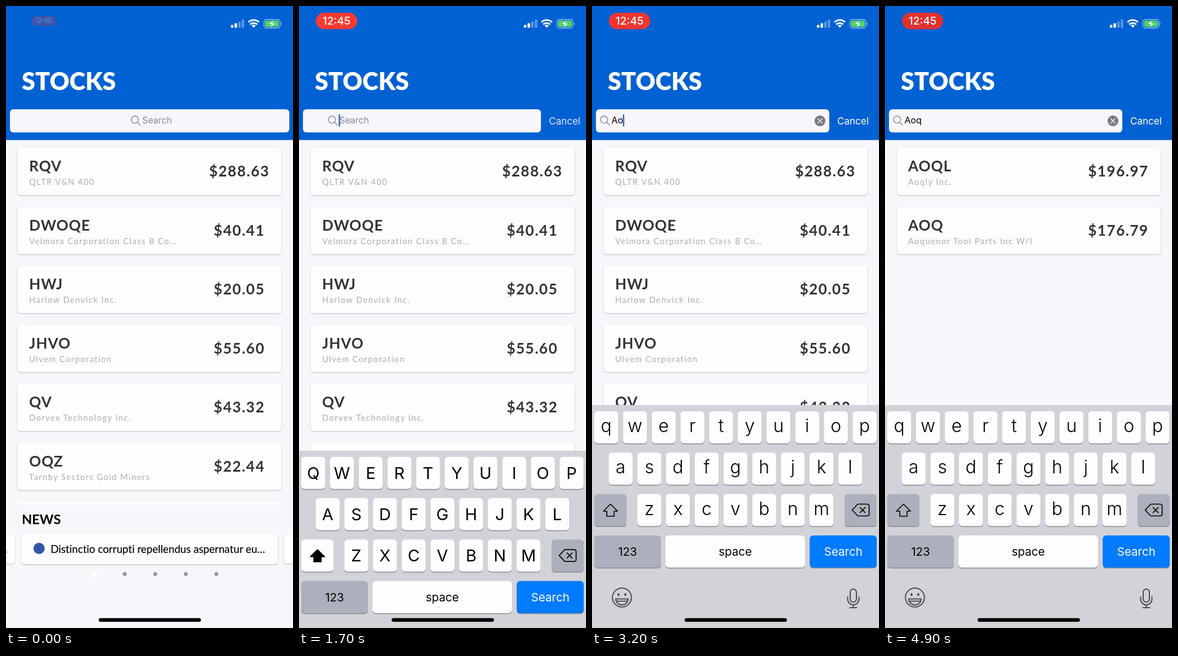
An HTML page that plays this animation: 508 by 1102 pixels, repeating every 5 s.

```html
<!DOCTYPE html>
<html lang="en">
<head>
<meta charset="utf-8">
<title>Stocks search</title>
<style>
html, body { margin: 0; width: 100%; height: 100%; overflow: hidden; background: #f8f6fa; }
svg { display: block; width: 100vw; height: 100vh; }
text { font-family: Inter, Roboto, sans-serif; }
.l { font-family: Lato, "Open Sans", sans-serif; font-variant-ligatures: none; }
.mid { text-anchor: middle; }
.card { fill: #fefdff; filter: drop-shadow(0 1px 1.3px rgba(0, 0, 0, .24)); }
.sym { font-size: 26px; font-weight: 700; letter-spacing: 1px; fill: #333236; }
.price { letter-spacing: 1.5px; }
.sub { font-size: 14.5px; letter-spacing: 1.5px; fill: #adabb0; }
.line { fill: none; stroke-linecap: round; stroke-linejoin: round; }
</style>
</head>
<body>
<svg viewBox="0 0 508 1102" preserveAspectRatio="none">
  <rect width="508" height="1102" fill="#f8f6fa"/>
  <g id="list"></g>

  <rect y="884" width="508" height="218" fill="#f8f6fa"/>
  <text class="l" x="28" y="918" font-size="23.5" font-weight="700">NEWS</text>
  <rect class="card" x="-20" y="936" width="36" height="52" rx="5"/>
  <rect class="card" x="492" y="936" width="36" height="52" rx="5"/>
  <rect class="card" x="27" y="935" width="454" height="54" rx="5"/>
  <circle cx=".5" cy="967.5" r="1" fill="#333"/>
  <circle cx="58.5" cy="961" r="10" fill="#2f56a6"/>
  <text class="l" x="79" y="969" font-size="18.7" stroke="#000" stroke-width=".15">Distinctio corrupti repellendus aspernatur eu…</text>
  <g id="dots"></g>

  <rect width="508" height="237.5" fill="#0061d3"/>
  <text class="l" x="28" y="149" font-size="43" font-weight="900" fill="#fff">STOCKS</text>

  <g id="pill">
    <rect x="-36.5" y="-14.5" width="73" height="29" rx="14.5"/>
    <text class="mid" y="6.7" font-size="19" font-weight="500" fill="#fff">12:45</text>
  </g>
  <g fill="#fff">
    <rect x="398" y="33.5" width="4.4" height="5" rx="1"/>
    <rect x="404.5" y="30.5" width="4.4" height="8" rx="1"/>
    <rect x="411" y="27.5" width="4.4" height="11" rx="1" opacity=".35"/>
    <rect x="417.3" y="24" width="4.4" height="14.5" rx="1" opacity=".35"/>
    <path d="M438.5 38.5l-3.6-3.8a5.2 5.2 0 0 1 7.2 0z"/>
  </g>
  <path d="M432.3 32.6a9 9 0 0 1 12.4 0M429.3 28.6a13.3 13.3 0 0 1 18.4 0" fill="none" stroke="#fff" stroke-width="2.9"/>
  <rect x="456.5" y="24" width="28.5" height="15" rx="4.2" fill="none" stroke="#fff" stroke-opacity=".6" stroke-width="1.3"/>
  <rect x="458.5" y="26" width="24.5" height="11" rx="2.4" fill="#4cd964"/>
  <path d="M486.5 29a3 3 0 0 1 0 5z" fill="#fff" opacity=".6"/>
  <path d="M474 24.5l-10 8h6l-2.5 6 10.5-8h-6.3z" fill="#fff" stroke="#2c9d6e" stroke-width=".7"/>

  <rect id="field" x="7" y="183" height="41" rx="6" fill="#f8f6fa"/>
  <g id="prompt">
    <g class="line" stroke="#8a898e" stroke-width="1.4">
      <circle cx="-13" cy="201.3" r="6.3"/>
      <path d="M-8.4 206L-3.5 211"/>
    </g>
    <text id="query" y="208" font-size="16" letter-spacing="-.1"></text>
    <rect id="caret" y="192" width="2.5" height="21.5" rx="1" fill="#2c68d2"/>
  </g>
  <g id="clear">
    <circle cx="403.5" cy="203.5" r="9.6" fill="#7b7a7f"/>
    <path class="line" d="M399.5 199.5l8 8m0-8l-8 8" stroke="#f8f6fa" stroke-width="1.3"/>
  </g>
  <text id="cancel" y="210" font-size="17" fill="#fff">Cancel</text>

  <g id="board"></g>
  <rect x="164" y="1084.5" width="181" height="6.5" rx="3.25"/>
</svg>

<script>
const $ = id => document.getElementById(id);
const clamp = x => Math.max(0, Math.min(1, x));
const smooth = x => { x = clamp(x); return x * x * (3 - 2 * x); };
const set = (el, attrs) => { for (const k in attrs) el.setAttribute(k, attrs[k]); };

const LOOP = 5000, STEP = 100, FOCUS = 1537;

const allRows = [
  ["RQV", "QLTR V&amp;N 400", "288.63"],
  ["DWOQE", "Velmora Corporation Class B Co…", "40.41"],
  ["HWJ", "Harlow Denvick Inc.", "20.05"],
  ["JHVO", "Ulvem Corporation", "55.60"],
  ["QV", "Dorvex Technology Inc.", "43.32"],
  ["OQZ", "Tarnby Sectors Gold Miners", "22.44"],
  ["", "", ""]
];
const first = ["AOQL", "Aoqly Inc.", "196.97"];
const twoLetterRows = [
  first,
  ["AOXE", "Aoxeta Inc.", "74.04"],
  ["AO", "Aovin Corporation", "29.53"],
  ["AOJ", "Aolverin Skylines Group Inc.", "34.08"],
  ["AOZ", "Aozin Energy Ltd.", "2.53"]
];
const threeLetterRows = [first, ["AOQ", "Aoquenor Tool Parts Inc W/I", "176.79"]];

// [start, value], the last one begun is in force
const results = [[0, allRows], [3700, twoLetterRows], [4500, threeLetterRows]];
const typed = [[0, ""], [FOCUS, ""], [2400, "A"], [3100, "Ao"], [4200, "Aoq"]];
const current = (steps, t) => steps.filter(s => s[0] <= t).pop();

const lists = results.map(r => r[1].map(([sym, name, price], i) => {
  const y = 251 + i * 104.5;
  return `<rect class="card" x="20.5" y="${y}" width="467" height="84" rx="5"/>` + (sym &&
    `<text class="l sym" x="41" y="${y + 42}">${sym}</text>
     <text class="l sub" x="41" y="${y + 66}">${name}</text>
     <text class="l sym price mid" x="413" y="${y + 51}">$${price}</text>`);
}).join(""));

$("dots").innerHTML = [0, 1, 2, 3, 4].map(i =>
  `<circle cx="${156 + i * 54.1}" cy="1006.5" r="${i ? 3.4 : 5.5}" fill="${i ? "#98979b" : "#fff"}"/>`).join("");

function key(x, y, w, label, size, base, fill = "#fefdff", ink = "#000", weight = 400) {
  return `<rect x="${x}" y="${y + 1.3}" width="${w}" height="57.2" rx="6" fill="#898a8e"/>
    <rect x="${x}" y="${y}" width="${w}" height="57" rx="6" fill="${fill}"/>
    <text class="mid" x="${x + w / 2}" y="${y + base}" font-size="${size}" font-weight="${weight}" fill="${ink}">${label}</text>`;
}

function keyboard(upper) {
  const rowY = [11, 84.2, 157.6, 231], grey = "#abb0bc";
  let s = `<rect width="508" height="420" fill="#d1d3d9"/>`;
  ["QWERTYUIOP", "ASDFGHJKL", "ZXCVBNM"].forEach((row, r) => {
    [...row].forEach((c, i) => {
      s += key([4, 29.4, 80.2][r] + i * 50.8, rowY[r], 42.5, upper ? c : c.toLowerCase(),
        upper ? 29 : 32, upper ? 39 : 37, "#fefdff", "#000", upper ? 400 : 300);
    });
  });
  s += key(4, rowY[2], 57, "", 20, 36, upper ? "#fefdff" : grey);
  s += key(447, rowY[2], 57, "", 20, 36, grey);
  s += key(4, rowY[3], 118, "123", 20.5, 36, grey);
  s += key(130, rowY[3], 247, "space", 20.5, 36);
  s += key(385.5, rowY[3], 118.5, "Search", 20.5, 36, "#007aff", "#fff");
  return s + `<g class="line" stroke="#000" stroke-width="1.7">
      <path transform="translate(32.7 186.5)" d="M0-11L12.5 1.5H6.5V10.5H-6.5V1.5H-12.5Z" fill="${upper ? "#000" : "none"}"/>
      <path transform="translate(475.5 186)" d="M-15 0L-6-9.5Q-5-10.5-4-10.5H11Q15-10.5 15-7V7Q15 10.5 11 10.5H-4Q-5 10.5-6 9.5ZM-1-4.5L8 4.5M8-4.5L-1 4.5"/>
    </g>
    <g class="line" stroke="#4b4c52" stroke-width="2">
      <g transform="translate(53 341)">
        <circle r="16.8"/>
        <path d="M-11 2.5H11A11 10.5 0 0 1-11 2.5ZM-9.5 6.5H9.5"/>
        <path d="M-6-6v1.5M6-6v1.5" stroke-width="3.6"/>
      </g>
      <g transform="translate(462.5 343)">
        <rect x="-5.5" y="-17" width="11" height="23" rx="5.5"/>
        <path d="M-10-3V1A10 10 0 0 0 10 1V-3M0 11V16M-6 16H6"/>
      </g>
    </g>`;
}

// Rebuild markup only when its state changes
const shown = {};
function fill(id, state, make) {
  if (shown[id] !== state) { shown[id] = state; $(id).innerHTML = make(); }
}

function draw(t) {
  const list = results.indexOf(current(results, t));
  fill("list", list, () => lists[list]);

  // Recording pill grows in, then pulses
  const grow = 1 - (1 - clamp(t / 350)) ** 2;
  const glow = .5 - .5 * Math.cos((t - 700) * Math.PI / 1000);
  const mix = (a, b) => Math.round(a + (b - a) * glow);
  set($("pill"), {
    transform: `translate(66.5 26.5) scale(${.59 + .41 * grow})`,
    opacity: .27 + .73 * grow,
    fill: `rgb(${mix(222, 255)},${mix(49, 58)},${mix(47, 49)})`
  });

  // Search field shrinks to make room for the cancel button
  const shrink = smooth((t - FOCUS) / 203);
  const slide = smooth((t - FOCUS) / 223);
  const right = 501.5 - 81.5 * shrink;
  const [since, word] = current(typed, t);
  set($("field"), { width: right - 7 });
  set($("prompt"), { transform: `translate(${241 - 206.5 * slide} 0)` });
  $("query").textContent = word || "Search";
  set($("query"), { fill: word ? "#000" : "#8a898e" });
  const caretX = word ? $("query").getComputedTextLength() - .3 : -1;
  const caretOn = t >= FOCUS && (t - since) % 1000 < 500;
  set($("caret"), { x: caretX, opacity: caretOn ? 1 : 0 });
  set($("clear"), { opacity: clamp((t - 2470) / 230) });
  set($("cancel"), { x: right + 14, opacity: clamp((shrink - .3) / .7) });

  // Critically damped slide
  const u = Math.max(0, t - FOCUS) * .0182;
  const rise = 1 - Math.exp(-u) * (1 + u);
  const upper = t < 2400;
  fill("board", upper, () => keyboard(upper));
  set($("board"), { transform: `translate(0 ${1102 - 395 * rise})` });
}

const start = performance.now();
function tick() {
  const t = (performance.now() - start) % LOOP;
  draw(Math.floor(t / STEP) * STEP);
  requestAnimationFrame(tick);
}
tick();
</script>
</body>
</html>
```
